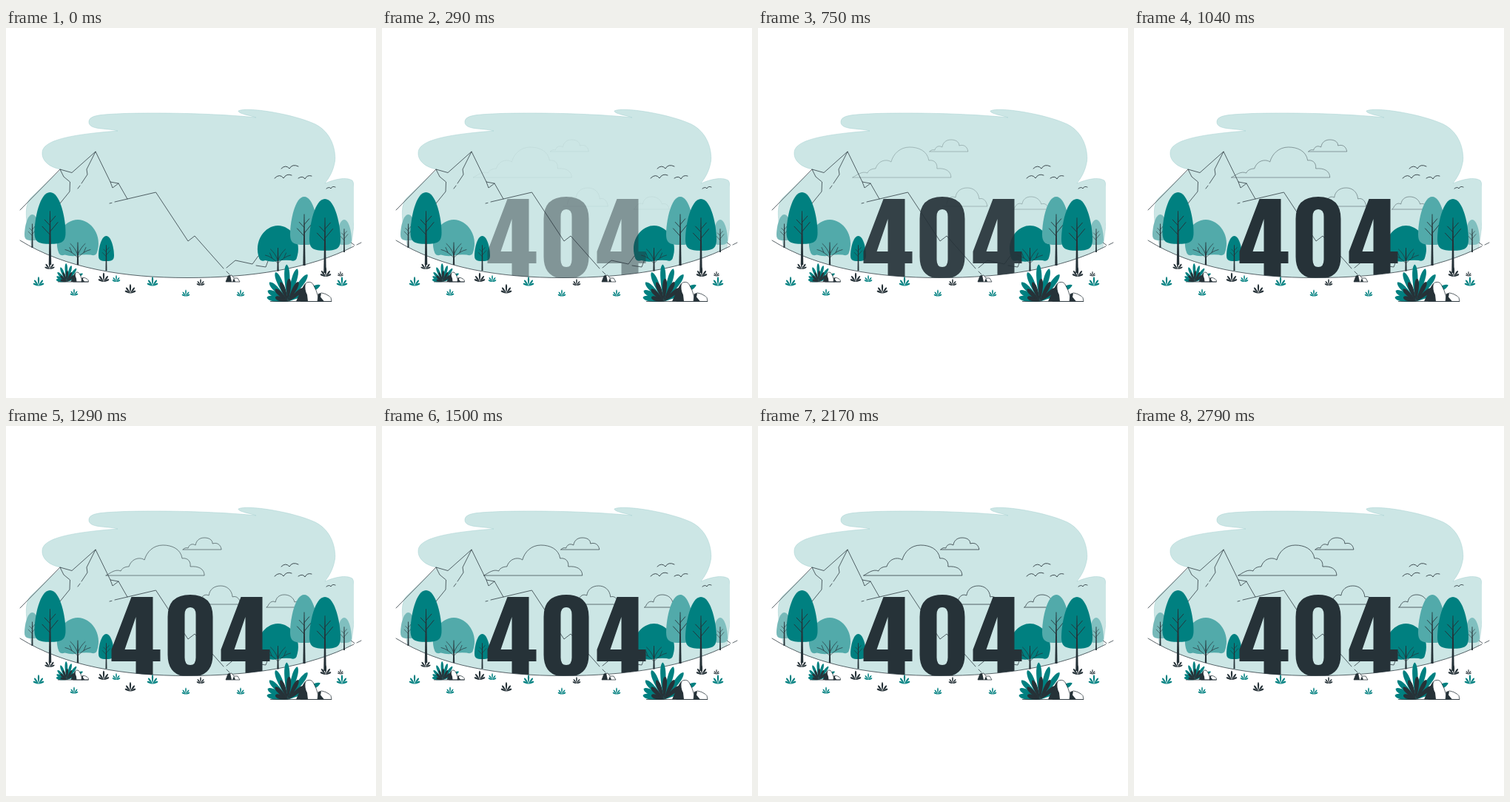
Recreate the animation shown at these times as an HTML page. Size 500x500 px, loop 2830 ms.

```html
<!DOCTYPE html>
<html lang="en">
<head>
<meta charset="utf-8">
<title>404</title>
<style>
html, body { margin: 0; width: 100%; height: 100%; overflow: hidden; background: #fff; }
svg { display: block; width: 100vw; height: 100vh; }
.line { fill: none; stroke: #263238; stroke-width: .75; stroke-linecap: round; stroke-linejoin: round; }
.rock { fill: #fff; stroke: #263238; stroke-width: .75; vector-effect: non-scaling-stroke; }
</style>
</head>
<body>
<svg id="stage" viewBox="0 0 500 500"></svg>
<script>
const LOOP = 2830, DARK = '#263238', TEAL = '#008080', SKY = '#cce6e5', PALE = '#52aaaa';
const GROUND = 'M19 287C80 325 160 337.500 245 337.500S410 326 470 295';

const shape = (d, fill) => `<path d="${d}" fill="${fill}"/>`;
const line = (d, width = .75) => `<path class="line" d="${d}" style="stroke-width:${width}"/>`;
const group = (x, y, scale, body) => `<g transform="translate(${x} ${y}) scale(${scale})">${body}</g>`;

// Leaves grow from the origin, angles measured from straight up
const leaf = (angle, len, w, fill) => `<path transform="rotate(${angle})" fill="${fill}" ` +
  `d="M0 0C${-w * .5} ${-len * .3} ${-w * 1.2} ${-len * .9} 0 ${-len}C${w * 1.2} ${-len * .9} ${w * .5} ${-len * .3} 0 0"/>`;
const fan = (list, w, fill) => list.map(([a, len]) => leaf(a, len, w, fill)).join('');

const tuft = (x, y, size, fill) => group(x, y, size / 11,
  fan([[-66, 8], [-36, 10], [0, 12.5], [36, 10], [66, 8]], 1.7, fill));

const trunk = (x, top, base, w) =>
  shape(`M${x - .4} ${top}L${x - w / 2} ${base}H${x + w / 2}L${x + .4} ${top}Z`, DARK);

function tallTree(x, top, bottom, w, base, fill) {
  const h = bottom - top, r = w / 2, y = f => top + h * f;
  const crown = `M${x} ${top}C${x + r * .65} ${top} ${x + r} ${y(.5)} ${x + r} ${y(.78)}` +
    `C${x + r} ${y(.96)} ${x + r * .75} ${bottom} ${x} ${bottom}` +
    `S${x - r} ${y(.96)} ${x - r} ${y(.78)}C${x - r} ${y(.5)} ${x - r * .65} ${top} ${x} ${top}Z`;
  const twig = (from, dx, to) => `M${x} ${y(from)}L${x + r * dx} ${y(to)}`;
  return shape(crown, fill) + trunk(x, y(.36), base, w / 14 + .5) +
    line(twig(.58, .35, .46) + twig(.64, -.35, .53) + twig(.76, .5, .58) + twig(.82, -.5, .66), w / 60 + .25);
}

function roundTree(x, top, base, r, fill) {
  const y = top + r, low = y + 18;
  const crown = `M${x - r + 4} ${low - 2}C${x - r - 5} ${y - 8} ${x - r * .6} ${top} ${x} ${top}` +
    `S${x + r + 5} ${y - 8} ${x + r - 4} ${low - 2}Q${x + r - 6} ${low + 2} ${x + r - 12} ${low}` +
    `Q${x + 8} ${low - 1} ${x} ${low + 1}T${x - r + 12} ${low}Q${x - r + 6} ${low + 2} ${x - r + 4} ${low - 2}Z`;
  const twigs = [-1, 1].map(s =>
    `M${x} ${low + 4}Q${x + s * 8} ${low - 5} ${x + s * 17} ${low - 7}` +
    `M${x} ${low}Q${x + s * 4} ${low - 10} ${x + s * 10} ${low - 15}M${x + s * 8} ${low - 3}L${x + s * 11} ${low - 10}`).join('');
  return shape(crown, fill) + trunk(x, y + 1, base, 2.4) + line(twigs, .7);
}

function bush(x, y, scale) {
  return group(x, y, scale,
    fan([[-79, 29], [-62, 31], [-44, 36], [-23, 43], [-2, 50], [16, 46], [36, 45], [63, 49]], 5.5, TEAL) +
    fan([[-72, 18], [-46, 24], [-21, 28], [3, 31], [28, 30], [50, 28]], 4.5, DARK) +
    '<path class="rock" d="M17 0L19 -15Q22 -25 27 -26Q33 -27 35 -21L38 -15L43 0Z"/>' +
    shape('M11 0L18 -16L24 -25Q22 -16 26 -9L27 0Z', DARK) +
    '<path class="rock" d="M40 0L41 -10Q45 -13 51 -10T58 -5L59 0Z"/>' +
    shape('M40 0L41 -10L45 -11L44 -6L49 0Z', DARK) +
    '<path class="rock" d="M-24 0H59" fill="none"/>');
}

const sky = 'M35 297C26 262 24 238 34 229L75 191C60 189 48 180 49 168C50 152 85 144 151 139' +
  'C135 135 112 138 112 127C112 117 130 117 160 115.500C220 114 290 116 338 121C330 118 314 116 314 112' +
  'C325 106 388 116 418 130C440 141 446 165 444.500 180C442 195 436 203 431 210C445 204 460 201 468 206' +
  'C474 215 472 260 466 297V345H35Z';

const mountains = 'M19 246L73 191L89 195.500L121 167L141 208L152 210L164 231M141 208L144 216L152 210' +
  'M121 167L109 191L110 198L102 210M100 213L97 217M73 191L78 201L86.500 208L86 221L73 237' +
  'M140 237L143 236.300M147 235L202.500 222L246 288L255 281L294 325' +
  'M298 324L310 314L333 319L341 308M338 321L351 323L354 315M298 329L302 333' +
  'M465 289L471 293.500M474 293L480 290';

const birds = 'M372 190Q378 184 383 190Q387 183 395 187M363 203Q370 196 375 203Q379 196 386 199' +
  'M395 203Q401 199 404 204Q407 198 413 200M433 217Q437 214 439 217Q441 213 445 215';

const clouds = 'M143 202H276C276 193 268 189 257 190C258 180 250 178 246 179C244 166 232 161 220 161' +
  'C207 161 198 170 195 181C190 177 178 178 174 190C168 190 164 193 163 196C156 193 150 198 143 202' +
  'M247 167H299C298 160 293 157 287 159C287 153 281 151 276 151C269 151 265 155 264 161' +
  'C259 158 255 161 254 165C251 164 249 165 247 167' +
  'M264 241H325C324 233 319 229 314 231C313 221 306 216 298 216C289 216 283 221 282 229C276 226 271 231 270 238' +
  'M360 245H408C407 239 402 236 398 238C396 231 390 228 384 228C377 228 373 232 372 238C367 235 363 240 362 243L360 245';

const four = x => `M${x + 27} 231H${x + 56}V302H${x + 66}V318H${x + 56}V345H${x + 33}V318H${x}V302Z` +
  `M${x + 33} 258L${x + 18} 302H${x + 33}Z`;
const zero = 'M218.500 258Q218.500 228 249 228T279.500 258V309Q279.500 339 249 339T218.500 309Z' +
  'M241.500 255V313Q241.500 323 249 323T256.500 313V255Q256.500 245 249 245T241.500 255Z';

const tufts = [
  [59, 326, 10, DARK], [132, 343, 11, DARK], [168, 358.500, 11, DARK], [263, 348, 8, DARK],
  [432, 336, 11, DARK], [452, 335.500, 6, DARK], [44, 348.500, 11, TEAL], [92, 361.500, 8, TEAL],
  [149, 343, 8, TEAL], [198, 348.500, 11, TEAL], [243, 362.500, 8, TEAL], [317, 362.500, 8, TEAL], [454, 348.500, 11, TEAL]
];

document.getElementById('stage').innerHTML =
  `<clipPath id="above"><path d="${GROUND}V0H19Z"/></clipPath>` +
  `<path d="${sky}" fill="${SKY}" stroke="#a3cfce" stroke-width=".5" clip-path="url(#above)"/>` +
  line(mountains) + line(birds, .85) +
  `<g id="clouds">${line(clouds)}</g>` +
  tallTree(35.5, 252, 287, 21, 297, '#77b9b9') + roundTree(97, 259, 320, 29.5, PALE) +
  tallTree(59.5, 222, 292, 42, 320, TEAL) + tallTree(135.5, 281, 315, 21, 328, TEAL) +
  roundTree(367.5, 267, 328.5, 29, TEAL) + tallTree(457, 259, 293, 20, 303, '#80bfbf') +
  tallTree(403, 228, 293, 38, 321, PALE) + tallTree(431, 231, 301, 42, 331, TEAL) +
  `<path id="digits" clip-path="url(#above)" fill-rule="evenodd" fill="${DARK}" d="${four(142.5)}${zero}${four(290.5)}"/>` +
  line(GROUND) +
  tufts.map(t => tuft(...t)).join('') + bush(381, 369.5, 1) + bush(82, 343, .5) +
  '<path class="rock" d="M297 343L300 335L305 334L308 338L313 338L316 343Z"/>' +
  shape('M297 343L300 335L303 334L305 343ZM306 343L308 338L310 343Z', DARK);

const cloudLayer = document.getElementById('clouds');
const digits = document.getElementById('digits');
const clamp = v => Math.min(1, Math.max(0, v));

function draw(now) {
  const t = now % LOOP;
  const fade = clamp(t / 1900);
  const shift = -10.5 * (1 - Math.cos(Math.PI * (t - 2300) / 2400));
  digits.setAttribute('opacity', 1 - (1 - clamp(t / 1000)) ** 1.75);
  cloudLayer.setAttribute('opacity', fade * fade * (3 - 2 * fade));
  cloudLayer.setAttribute('transform', `translate(${shift} 0)`);
}

const start = performance.now();
function tick() {
  draw(performance.now() - start);
  requestAnimationFrame(tick);
}
tick();
</script>
</body>
</html>
```
